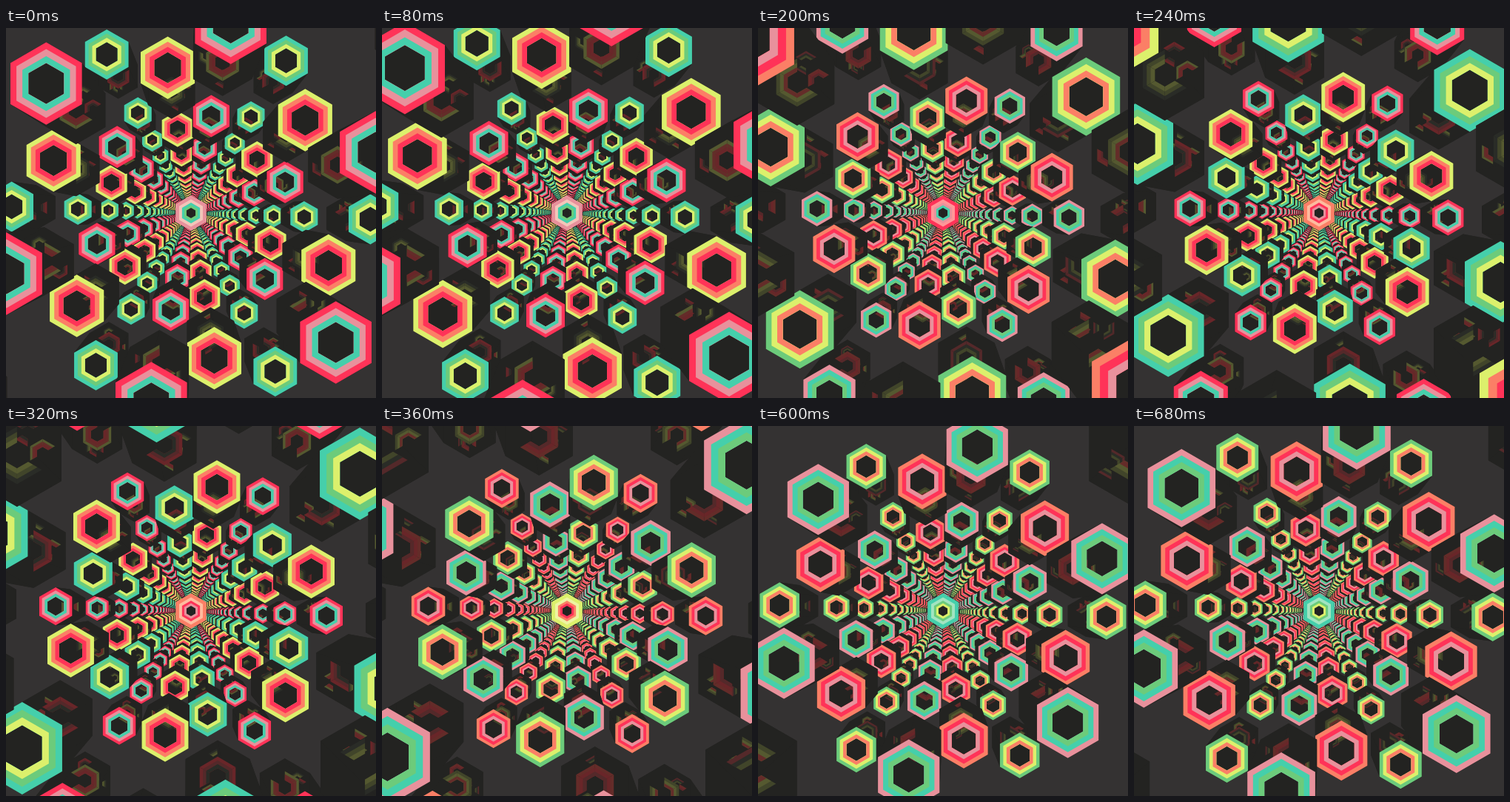
An HTML page with a canvas that plays this animation: 500 by 500 pixels, repeating every 720 ms.

```html
<!DOCTYPE html>
<html lang="en">
<head>
<meta charset="utf-8">
<title>Hexagon tunnel</title>
<style>
  html, body { margin: 0; width: 100%; height: 100%; overflow: hidden; background: #343232; }
  canvas { display: block; width: 500px; height: 500px; }
</style>
</head>
<body>
<canvas id="stage" width="500" height="500"></canvas>
<script>
const ctx = document.getElementById('stage').getContext('2d');
const LOOP = 720, TICK = 40, COLOR_STEP = 120;
const BACK = '#343232', DARK = '#232321';
const COLORS = ['#ff3358', '#e8919c', '#45cfab', '#6ccb7b', '#dcf06c', '#fb7f66'];
const DIM = ['#692629', '#54292a', '#2a2c27', '#41452a', '#555930', '#642c29'];

// Each family: six axes, depth phase, distance from the middle, first colour.
const FAMILIES = [
  { angle: 41.8, phase: 0.04, dist: 273, color: 0 },
  { angle: 20.9, phase: 0.373, dist: 273, color: 4 },
  { angle: 2, phase: 0.707, dist: 414, color: 2 }
];
const SIZE = 58, PLATE = 60, DEPTH = 0.27, NEAR = 0.2, LAYERS = 17, BAND = 0.167;

const CORNERS = Array.from({ length: 6 }, (_, i) => {
  const a = (i * 60 - 90) * Math.PI / 180;
  return [Math.cos(a), Math.sin(a)];
});

const mod6 = n => ((n % 6) + 6) % 6;
const noise = n => {
  const v = Math.sin(n * 127.1 + 11.7) * 43758.5453;
  return v - Math.floor(v);
};

function hex(x, y, r) {
  return CORNERS.map(([cx, cy]) => [x + cx * r, y + cy * r]);
}

function trace(points) {
  points.forEach(([x, y], i) => i ? ctx.lineTo(x, y) : ctx.moveTo(x, y));
  ctx.closePath();
}

function fill(color, ...shapes) {
  ctx.fillStyle = color;
  ctx.beginPath();
  shapes.forEach(trace);
  ctx.fill('evenodd');
}

function side(a, b, i) {
  const j = (i + 1) % 6;
  return [a[i], a[j], b[j], b[i]];
}

// Every band reaches in to the hole, so no seams show between them.
function rings(x, y, r, first) {
  const hole = hex(x, y, r * (1 - 3 * BAND));
  for (let k = 0; k < 3; k++) {
    fill(COLORS[mod6(first + k)], hex(x, y, r * (1 - k * BAND)), hole);
  }
}

function brokenRings(x, y, r, first, seed, keep) {
  const hole = hex(x, y, r * 0.45);
  for (let i = 0; i < 6; i++) {
    if (noise(seed * 7 + i) > keep) continue;
    for (let k = 0; k < 3; k++) {
      fill(DIM[mod6(first + k)], side(hex(x, y, r * (1 - k * 0.18)), hole, i));
    }
  }
}

// Dim, partly hidden rings on the back of a tube.
function fragments(x, y, r, first, seed) {
  for (let k = 0; k < 2; k++) {
    const a = noise(seed + k * 3.1) * Math.PI * 2;
    brokenRings(x + Math.cos(a) * r * 0.5, y + Math.sin(a) * r * 0.5,
      r * 0.28, first + 2 + k * 2, seed + k + 31, 0.5);
  }
  brokenRings(x, y, r * 0.56, first, seed, 0.7);
}

function tube({ family, z, axis, step }) {
  const a = (family.angle + axis * 60) * Math.PI / 180;
  const at = (depth, size) => {
    const d = family.dist / depth;
    return [250 + Math.cos(a) * d, 250 + Math.sin(a) * d, size / depth];
  };
  const front = at(Math.max(z, NEAR), SIZE), back = at(z + DEPTH, PLATE);
  const near = hex(...front), far = hex(...back);
  fill(DARK, far);
  for (let i = 0; i < 6; i++) fill(DARK, side(near, far, i));
  fill(DARK, near);
  if (z < 5) fragments(...back, family.color - 2 - step, axis + family.color * 6 + 1);
  if (z > NEAR) rings(...front, family.color - step);
}

function core(step) {
  const c = k => COLORS[mod6(1 - step + k)];
  fill(c(0), hex(250, 250, 24));
  fill('rgba(255,250,215,0.5)', hex(250, 250, 18.5));
  fill(c(1), hex(250, 250, 14));
  fill(c(2), hex(250, 250, 10.5));
  fill(DARK, hex(250, 250, 7));
}

function draw(time) {
  const t = Math.floor((time % LOOP) / TICK) * TICK;
  const step = Math.floor(t / COLOR_STEP);
  const tubes = [];
  for (const family of FAMILIES) {
    for (let n = 0; n < LAYERS; n++) {
      const z = n + family.phase - t / LOOP;
      if (z + DEPTH < NEAR + 0.05) continue;
      for (let axis = 0; axis < 6; axis++) tubes.push({ family, z, axis, step });
    }
  }
  tubes.sort((a, b) => b.z - a.z);
  ctx.fillStyle = BACK;
  ctx.fillRect(0, 0, 500, 500);
  tubes.forEach(tube);
  core(step);
}

const start = performance.now();
function frame() {
  draw(performance.now() - start);
  requestAnimationFrame(frame);
}
frame();
</script>
</body>
</html>
```
